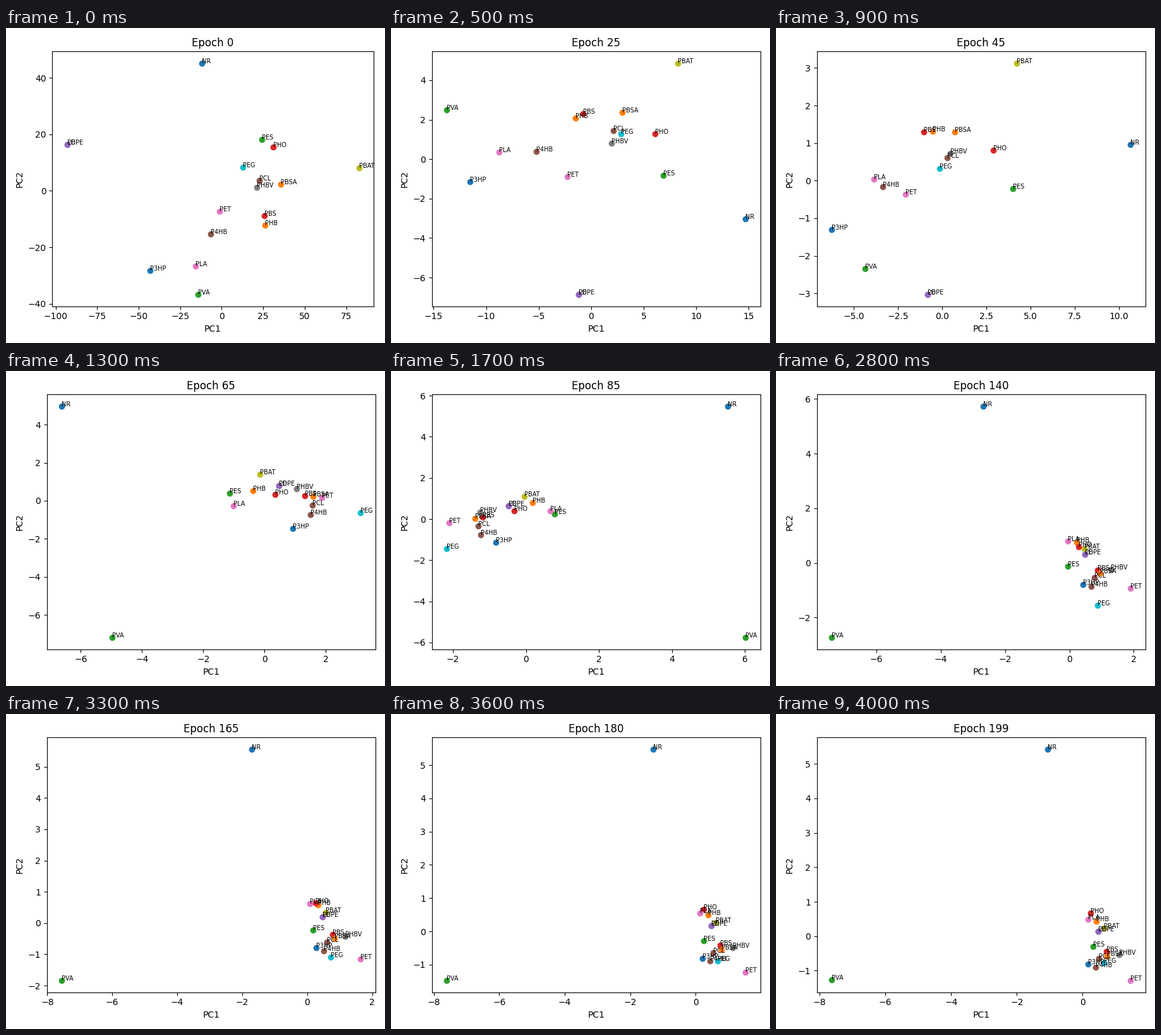
A matplotlib script for the animation above (4.1 s loop, 600 by 500 pixels).

```python
import numpy as np
import matplotlib.pyplot as plt
from matplotlib.animation import FuncAnimation

FRAMES, STEP, LAST = 41, 5, 199
SWAP, MID, LATE = 15, 25, 65     # epochs where the motion changes character

# Key points of each dot at epochs 0, 25, 65 and 199, in drawing order
PE = (-93.2, 16.4), (-1.17, -6.87), (.47, .80), (.48, .14)
DOTS = {
    "P3HP": [(-43.2, -28.3), (-11.57, -1.14), (.93, -1.46), (.17, -.81)],
    "PHB": [(26.0, -12.2), (-1.47, 2.09), (-.37, .53), (.42, .44)],
    "PVA": [(-14.3, -36.8), (-13.74, 2.50), (-4.97, -7.19), (-7.63, -1.27)],
    "PBS": [(25.6, -8.9), (-.75, 2.31), (1.32, .27), (.73, -.44)],
    "PE": PE,
    "PCL": [(22.7, 3.6), (2.13, 1.45), (1.57, -.23), (.50, -.65)],
    "PET": [(-1.4, -7.3), (-2.25, -.89), (1.88, .17), (1.46, -1.29)],
    "PHBV": [(21.2, 1.2), (1.95, .81), (1.05, .63), (1.10, -.53)],
    "PBAT": [(82.6, 8.1), (8.27, 4.87), (-.14, 1.39), (.65, .23)],
    "PEG": [(12.7, 8.3), (2.86, 1.29), (3.14, -.63), (.65, -.77)],
    "NR": [(-12.0, 45.2), (14.70, -3.03), (-6.62, 4.97), (-1.06, 5.43)],
    "PBSA": [(35.5, 2.3), (2.98, 2.38), (1.59, .23), (.75, -.57)],
    "PES": [(24.1, 18.1), (6.88, -.82), (-1.13, .40), (.31, -.30)],
    "PHO": [(30.9, 15.5), (6.10, 1.29), (.35, .33), (.25, .67)],
    "LDPE": PE,
    "P4HB": [(-6.7, -15.3), (-5.20, .39), (1.51, -.73), (.40, -.90)],
    "PLA": [(-15.7, -26.7), (-8.75, .36), (-1.01, -.27), (.17, .49)],
}
# Sideways bow of the late paths; the other dots run straight
SWAY = {"NR": (-.35, .6), "PVA": (-.6, 0), "PEG": (-.55, -1.15),
        "PLA": (.1, .7), "PHB": (0, .42), "PET": (.48, 0),
        "PHBV": (.28, 0), "P3HP": (.1, .25)}

start, mid, late, end = np.array(list(DOTS.values())).swapaxes(0, 1)
sway = np.array([SWAY.get(name, (0, 0)) for name in DOTS])
# bring the early poses into the orientation of the late ones
start = start[:, ::-1] * [-1, 1]
mid = mid * [-1, 1]


def lerp(a, b, u):
    return a + (b - a) * u


def collapse(u):
    """Each axis shrinks exponentially while the dots rearrange."""
    s0, s1 = abs(start).max(axis=0), abs(mid).max(axis=0)
    return lerp(start / s0, mid / s1, u) * s0 ** (1 - u) * s1 ** u


def settle(u):
    k = 1 - (1 - u) ** 1.7
    return lerp(late, end, k) + sway * np.sin(np.pi * k)


def points(epoch):
    if epoch < MID:
        xy = collapse(epoch / MID)
    elif epoch < LATE:
        xy = lerp(mid, late, (epoch - MID) / (LATE - MID))
    else:
        xy = settle((epoch - LATE) / (LAST - LATE))
    # the sign of the first component is arbitrary and jumps
    if epoch < LATE or 80 <= epoch < 130:
        xy = xy * [-1, 1]
    # early on the two components are ranked the other way round
    return xy[:, ::-1] if epoch < SWAP else xy


fig, ax = plt.subplots(figsize=(6, 5), dpi=100)


def update(i):
    epoch = min(i * STEP, LAST)
    ax.clear()
    fig.subplots_adjust(left=.125, right=.9, bottom=.11, top=.88)
    for n, (name, (x, y)) in enumerate(zip(DOTS, points(epoch))):
        ax.scatter(x, y, color=f"C{n % 10}")
        ax.text(x, y, name, fontsize=7)
    ax.set_title(f"Epoch {epoch}")
    ax.set_xlabel("PC1")
    ax.set_ylabel("PC2")
    fig.tight_layout()
    return []


anim = FuncAnimation(fig, update, frames=FRAMES, interval=100, repeat=True)
plt.show()
```
